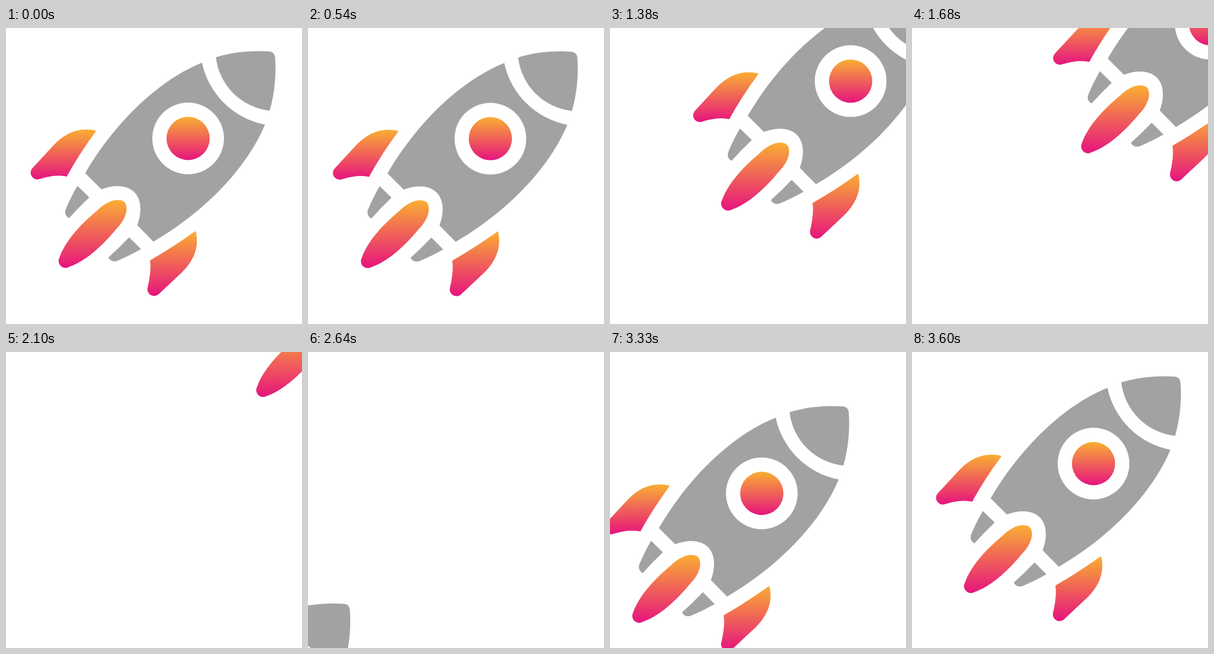
Recreate the animation shown at these times as an HTML page. Size 512 by 512 pixels, loop 3630 ms.

```html
<!DOCTYPE html>
<html lang="en">
<head>
<meta charset="utf-8">
<title>Rocket</title>
<style>
  html, body { margin: 0; width: 100%; height: 100%; overflow: hidden; background: #fff; }
  svg { display: block; width: 100%; height: 100%; }
</style>
</head>
<body>
<svg viewBox="0 0 512 512">
  <defs>
    <linearGradient id="glow" x1="0" y1="0" x2="0" y2="1">
      <stop offset="0" stop-color="#f9ae33"/>
      <stop offset="1" stop-color="#e6147e"/>
    </linearGradient>
  </defs>
  <g id="rocket">
    <g fill="#a2a2a2">
      <!-- nose, body, tail pieces -->
      <path d="M363 50.500C392 41.500 424 38.500 454 40.500Q465 41 465.500 52C467.500 80 465 113 456 143A105 105 0 0 1 363 50.500Z"/>
      <path d="M339 60C268.500 88.400 192.400 156.800 137 251L165 279C186 271 209 271 222 284C235 297 235 320 227 341L255 369.500C349.500 314 418.500 238 448 167A138 138 0 0 1 339 60Z"/>
      <path d="M123.500 273L144 293Q125 311 109 329C102 325 101 318 104 312Q112 293 123.500 273Z"/>
      <path d="M233.500 382.500L213 362Q195 381 177 397C181 404 188 405 194 402Q213 394 233.500 382.500Z"/>
    </g>
    <circle cx="315" cy="191" r="62" fill="#fff"/>
    <g fill="url(#glow)">
      <!-- window, fins, flame -->
      <circle cx="315" cy="191" r="37.400"/>
      <path d="M156 178C128 170.500 104 181 84 201L46.500 241.500A11.600 11.600 0 0 0 57.500 261.300C77 255.500 92 254 105 257Q127 217 156 178Z"/>
      <path d="M328 351C335 378 325 402 305 422L264.500 460A11.600 11.600 0 0 1 245 449C249.500 430 251 414 249 402Q289 379 328 351Z"/>
      <path d="M158 315.500C169 304.500 182 297.500 193 297.500C204 297.500 208.500 302 208.500 313C208.500 324 201.500 337 190.500 348C165 379 136 404 109 413.300A12 12 0 0 1 92.500 397C102 370 127 341 158 315.500Z"/>
    </g>
  </g>
</svg>
<script>
  const LOOP = 3630, STEP = 30;
  const rocket = document.getElementById('rocket');

  // Arrival from the lower left: [time, dx, dy]
  const arrival = [
    [2490, -468, 469], [2640, -393, 395], [3030, -180, 181], [3120, -136, 137.5],
    [3360, -42, 43], [3480, -14, 15], [3570, -1.5, 2.4], [3600, -1, 2]
  ];

  const slope = (i, axis) => {
    const a = arrival[Math.max(i - 1, 0)], b = arrival[Math.min(i + 1, arrival.length - 1)];
    return (b[axis] - a[axis]) / (b[0] - a[0]);
  };

  // Cubic Hermite curve through the arrival points
  function arrive(t, axis) {
    let i = arrival.findIndex(p => p[0] > t) - 1;
    if (i < 0) i = arrival.length - 2;
    const a = arrival[i], b = arrival[i + 1];
    const span = b[0] - a[0], u = (t - a[0]) / span, v = 1 - u;
    return v * v * (1 + 2 * u) * a[axis] + u * u * (3 - 2 * u) * b[axis]
      + span * u * v * (v * slope(i, axis) - u * slope(i + 1, axis));
  }

  function offset(t) {
    if (t <= 1050) {
      const drift = (t / 1050) ** 3;
      return [3.5 * drift, 3 * drift];
    }
    if (t < 2490) {
      const s = t - 1080;
      return [1 + 0.3342 * s, -0.3305 * s];
    }
    return [arrive(t, 1), arrive(t, 2)];
  }

  let start;
  function draw(now) {
    start ??= now;
    const t = Math.floor(((now - start) % LOOP) / STEP) * STEP;
    const [x, y] = offset(t);
    rocket.setAttribute('transform', `translate(${x.toFixed(2)} ${y.toFixed(2)})`);
    requestAnimationFrame(draw);
  }
  requestAnimationFrame(draw);
</script>
</body>
</html>
```
